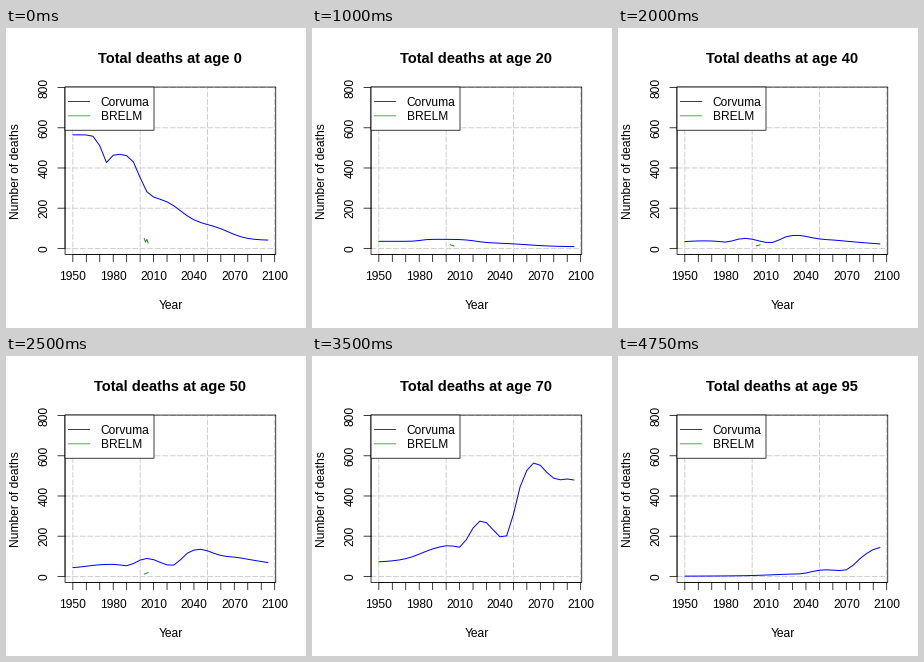
Recreate the animation shown at these times as a matplotlib script. Size 300 by 300 pixels, loop 5000 ms.

```python
import numpy as np
import matplotlib.pyplot as plt
from matplotlib.animation import FuncAnimation

SIZE, DPI = 300, 100
PX = 72 / DPI                      # points per pixel
THIN = 0.75                        # pen for frame, ticks, grid and legend
LEFT, RIGHT, TOP, BOTTOM = 59.04, 269.76, 59.04, 226.56
START, END, PEAK = 1950, 2095, 772
YEARS = np.arange(START, END + 1, 5)
SHORT_YEARS = np.arange(2003, 2007)

plt.rcParams.update({"font.family": "Liberation Sans", "path.snap": False})


def rise(x, mid, width):
    return 1 / (1 + np.exp(-(x - mid) / width))


def bump(x, mid, width):
    return np.exp(-0.5 * ((x - mid) / width) ** 2)


def infant(year):
    return (565 - 95 * rise(year, 1970, 2) - 50 * bump(year, 1975, 2.5)
            - 215 * rise(year, 1999.5, 3) - 135 * rise(year, 2030, 6.5)
            - 80 * rise(year, 2066, 7))


def young(year):
    return (35 + 10 * rise(year, 1981, 2.5) - 17 * rise(year, 2022, 4.5)
            - 20 * rise(year, 2060, 11))


def cohort(born):
    """Deaths at age 60 by year of birth."""
    return (55 + 45 * rise(born, 1911, 7) + 120 * rise(born, 1980.5, 2.5)
            - 17 * bump(born, 1941, 4) + 60 * bump(born, 1956, 7.5)
            - 9 * bump(born, 1974, 3.5) + 62 * bump(born, 1995, 8)
            - 2 * np.maximum(0, born - 2022))


# Deaths relative to age 60, for people born in 1940 and in 2000
AGES = [40, 60, 70, 80, 90, 95]
IN_1940 = [0.35, 1, 1.63, 1.7, 0.55, 0.136]
IN_2000 = [0.22, 1, 2.04, 2.8, 1.6, 0.53]


def level(age, born):
    early = np.interp(age, AGES, np.log(IN_1940))
    late = np.interp(age, AGES, np.log(IN_2000))
    return np.exp(early + (late - early) * (born - 1940) / 60)


def deaths(age):
    born = YEARS - age
    if age == 0:
        return infant(YEARS)
    if age < 20:
        return 310 / age * (infant(YEARS) / 560) ** 1.2
    old = cohort(born) * level(age, born)
    mix = min(1, (age - 20) / 20)
    return (1 - mix) * young(born + 20) + mix * old


def short_series(age):
    if age > 60:
        return np.full(4, np.nan)
    zigzag = 8 * np.exp(-age / 8) * (-1.0) ** np.arange(4)
    tilt = 4 * np.tanh((age - 32) / 10) * np.linspace(-1, 1, 4)
    return 15 + 23 * np.exp(-age / 3) + zigzag + tilt


def x_at(year):
    share = (year - START) / (END - START)
    return LEFT + (RIGHT - LEFT) * (0.04 + share) / 1.08


def y_at(value):
    return BOTTOM - (BOTTOM - TOP) * (0.04 + value / PEAK) / 1.08


fig = plt.figure(figsize=(SIZE / DPI, SIZE / DPI), dpi=DPI, facecolor="white")
ax = fig.add_axes([0, 0, 1, 1])
ax.set(xlim=(0, SIZE), ylim=(SIZE, 0))
ax.axis("off")


def line(xs, ys, color="black", z=3, width=THIN, **kw):
    return ax.plot(xs, ys, color=color, lw=width * PX, zorder=z,
                   solid_capstyle="round", solid_joinstyle="round", **kw)[0]


def text(x, y, s, size=12, ha="center", z=3, **kw):
    return ax.text(x, y, s, fontsize=size * PX, ha=ha, va="baseline",
                   zorder=z, **kw)


def upright(x, y, s):
    text(x, y, s, rotation=90, rotation_mode="anchor")


def box(x0, y0, x1, y1, z, fill="none"):
    ax.add_patch(plt.Rectangle((x0, y0), x1 - x0, y1 - y0, lw=THIN * PX,
                               fc=fill, ec="black", joinstyle="round",
                               zorder=z))


# Grid
dash = dict(color="silver", z=2, dashes=[7, 3], dash_capstyle="round")
for year in range(1950, 2101, 50):
    line([x_at(year)] * 2, [BOTTOM, TOP], **dash)
for value in range(0, 801, 200):
    line([LEFT, RIGHT], [y_at(value)] * 2, **dash)

# Axes
box(LEFT, TOP, RIGHT, BOTTOM, 3)
line([x_at(1950), x_at(2100)], [BOTTOM] * 2)
line([LEFT] * 2, [y_at(0), y_at(800)])
for year in range(1950, 2101, 10):
    line([x_at(year)] * 2, [BOTTOM, BOTTOM + 7.2])
    if year % 30 == 0:
        text(x_at(year), 252.48, str(year))
for value in range(0, 801, 200):
    line([LEFT, LEFT - 7.2], [y_at(value)] * 2)
    upright(41.76, y_at(value), str(value))

mid_x, mid_y = (LEFT + RIGHT) / 2, (TOP + BOTTOM) / 2
text(mid_x, 281.28, "Year")
upright(12.96, mid_y, "Number of deaths")
title = text(mid_x, 34.8, "", size=14.6, weight="bold")

# Legend
box(LEFT, TOP, 148, TOP + 43.2, 5, "white")
for row, (name, color) in enumerate([("Corvuma", "black"),
                                     ("BRELM", "forestgreen")], 1):
    y = TOP + 14.4 * row
    line([62.28, 83.88], [y, y], color, 6)
    text(94.68, y + 4.3, name, ha="left", z=6)

long_line = line(x_at(YEARS), 0 * YEARS, "blue", 4, width=1)
short_line = line(x_at(SHORT_YEARS), np.zeros(4), "forestgreen", 4, width=1)


def draw(i):
    age = 5 * i
    title.set_text(f"Total deaths at age {age}")
    long_line.set_ydata(y_at(deaths(age)))
    short_line.set_ydata(y_at(short_series(age)))
    return title, long_line, short_line


anim = FuncAnimation(fig, draw, frames=20, interval=250, repeat=True,
                     repeat_delay=0)
plt.show()
```
